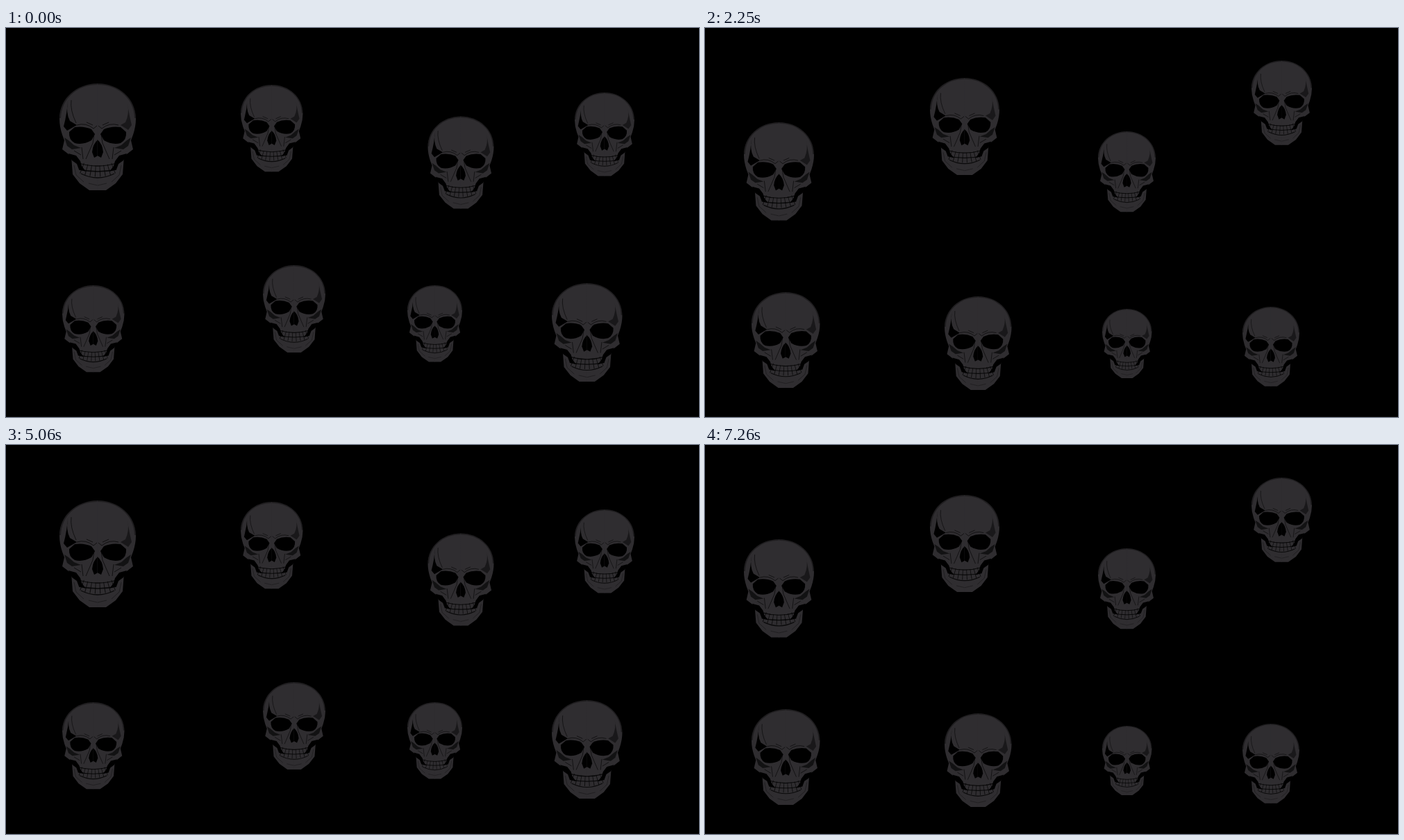
An HTML page that plays this animation: 998 by 561 pixels, repeating every 8 s.

```html
<!DOCTYPE html>
<html lang="en">
<head>
<meta charset="utf-8">
<title>Skulls</title>
<style>
  html, body { margin: 0; width: 100%; height: 100%; overflow: hidden; background: #000; }
  svg { display: block; width: 100%; height: 100%; }
</style>
</head>
<body>
<svg viewBox="0 0 998 561">
  <defs>
    <!-- left half of the face, mirrored for the right -->
    <g id="half">
      <path fill="#2f2d30" d="M55.5 0C24 0 0 22 0 51Q0 62 4 74L7 82L4 95L17 105L19 131L29 144L43 154H55.5Z"/>
      <path d="M14 70L22 63Q35 61 46 66L51 73L46 82Q34 89 22 86Q13 81 14 70Z"/>
      <path d="M55.5 81Q48 87 47 99L50 107L55.5 104Z"/>
      <path d="M13 101L24 104L30 112L32 119L38 127L28 124L25 116L18 111Z"/>
      <path d="M7 78L13 82L21 89L31 93L18 95L11 90Z" opacity=".6"/>
      <g fill="none" stroke="#000" stroke-opacity=".65">
        <path d="M1 50C2 20 26 1 55 1" stroke-opacity=".35" stroke-width="2"/>
        <path d="M25 60Q38 56 49 65L54 61M39 56L48 60M50 73L48 86L38 109M32 92L34 109M21 97L31 103"/>
        <path d="M21 118L24 132L35 142M42 144L55 147" stroke-opacity=".35"/>
      </g>
    </g>
    <g id="skull">
      <use href="#half"/>
      <use href="#half" transform="matrix(-1 0 0 1 110 0)"/>
      <path d="M12 25Q9 43 15 54L25 60L11 68L6 62Q11 43 12 25Z"/>
      <path d="M98 30Q101 43 95 56L88 60L99 67L104 60Q100 43 98 30Z" opacity=".45"/>
      <g fill="none" stroke="#000">
        <path d="M17 24Q15 38 24 57" opacity=".6"/>
        <path d="M28 115Q55 123 82 115M28 124Q55 130 82 124M31 130Q55 142 79 130" stroke-width="1.3" opacity=".8"/>
        <path d="M32 122Q55 131 78 122" stroke-width="16" stroke-dasharray="1 5.6" opacity=".7"/>
      </g>
    </g>
  </defs>
  <g class="pose"></g>
  <g class="pose"></g>
  <path d="M0 560.5H998" stroke="#0a0a0a"/>
</svg>
<script>
// Each skull: left, top, width
const layouts = [
  [[77, 80, 110], [338, 82, 89.5], [607.5, 127.5, 95], [819, 93, 86],
   [81, 371, 89.5], [370, 342, 90], [578, 371, 79], [786, 368, 101.5]],
  [[56, 136, 101], [324, 72, 100], [566, 149, 83], [787, 47, 87],
   [67, 381, 98.5], [345, 387, 96.5], [572, 405, 71.5], [774, 402, 82]]
];
const switches = [500, 3410, 6160], LOOP = 8000;
const poses = document.querySelectorAll('.pose');

poses.forEach((pose, i) => {
  pose.innerHTML = layouts[i].map(([x, y, w]) =>
    `<use href="#skull" transform="translate(${x} ${y}) scale(${w / 110})"/>`).join('');
});

const start = performance.now();
function draw() {
  const t = (performance.now() - start) % LOOP;
  const active = switches.filter(s => t >= s).length % 2;
  poses.forEach((pose, i) => pose.style.display = i === active ? '' : 'none');
  requestAnimationFrame(draw);
}
draw();
</script>
</body>
</html>
```
